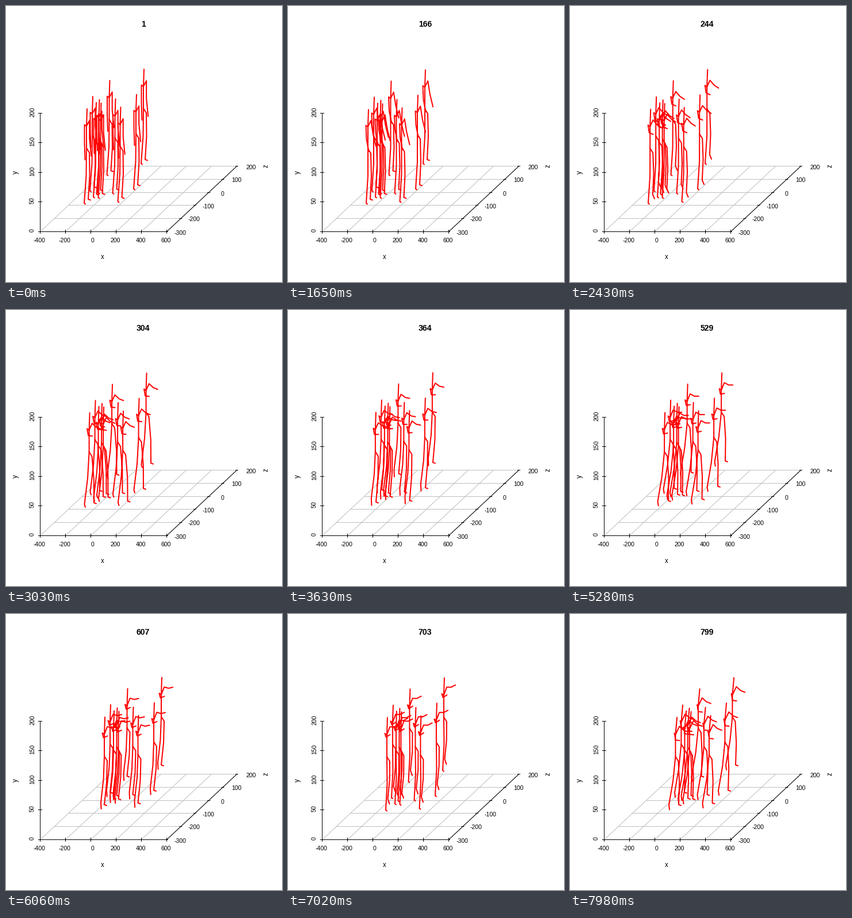
A matplotlib script that plays this animation: 480x480 px, repeating every 8 s.

```python
import numpy as np
import matplotlib.pyplot as plt
from matplotlib.animation import FuncAnimation

SIZE, DPI = 480, 80
LOOP, STEPS = 8000, 267
PX = 72 / DPI  # points per pixel

t = np.arange(STEPS) * 30.0


def span(start, end):
    return np.clip((t - start) / (end - start), 0, 1)


def ease(start, end):
    u = span(start, end)
    return u * u * (3 - 2 * u)


def point(x, y):
    """One (x, y) pair for each step."""
    return np.stack(np.broadcast_arrays(x, y, t)[:2], axis=1)


def mix(a, b, u):
    return a + (b - a) * u


def foot(x, y, swings, toe):
    """Ankle and toe paths from swings given as (start, end, stride)."""
    lift = 0
    for start, end, stride in swings:
        x = x + stride * ease(start, end)
        lift = lift + np.sin(np.pi * span(start, end))
    tip = point(x + toe - 1.5 * lift, y + 1.5 - 4 * lift)
    return point(x, y - 15 * lift), tip


def knee(hip, ankle):
    return (hip + ankle) / 2 + [1.5, 0]


# ---- one walker, in pixels ----
head = point(141 - ease(0, 1500) + 15.5 * ease(2300, 4100)
             + 16.5 * ease(4500, 5900) + 16 * ease(6800, 8300),
             179 + 1.2 * np.sin(2 * np.pi * t / 5800))
lean = -1 - 1.7 * ease(7300, 8000)
neck = head + point(lean, 30)
pelvis = head + point(lean, 68)
hip_r = pelvis + [5, 8]
shoulder_l = head + [-4.5, 27.5]
shoulder_r = head + point(4.2, 20 - 4.5 * t / LOOP)

# arms hang, then rise and sway up and down
rise = ease(1000, 2700)
reach = np.sin(rise * np.pi / 2)
sway = np.interp(t, [3000, 4300, 5300, 7000, 8000], [10, 4, 4, -4, 10])
elbow_r = shoulder_r + point(7.5 * reach, mix(31, 2 + 0.5 * sway, rise))
hand_r = shoulder_r + point(mix(3, 15, reach), mix(62, sway, rise))
elbow_l = shoulder_l + point(2 * reach, mix(30, 8 + 0.4 * sway, rise))
hand_l = shoulder_l + point(mix(1, 9, reach), mix(61, 5 + 0.8 * sway, rise))

rising = ease(2300, 5200)
ankle_l, toe_l = foot(136, 343 - 2 * rising, toe=2, swings=[
    (2900, 4200, 15), (5000, 6600, 19), (7700, 9100, 19)])
ankle_r, toe_r = foot(143, 336 - 4.5 * rising, toe=4, swings=[
    (2300, 3000, 10), (4400, 5200, 18), (6750, 7900, 18)])

gap = np.full_like(head, np.nan)
body = np.stack([
    head, neck, pelvis, hip_r, knee(hip_r, ankle_r), ankle_r, toe_r, gap,
    pelvis, knee(pelvis, ankle_l), ankle_l, toe_l, gap,
    hand_l, elbow_l, shoulder_l, neck, shoulder_r, elbow_r, hand_r, gap,
], axis=1)

# where the others stand, relative to the first walker
crowd = np.array([(0, 0), (10, -21.5), (16, -11), (21.5, -16), (24.5, -10),
                  (39.5, -49.5), (49.5, -17.5), (58.5, -3), (99, -69),
                  (86, -25)])

# ---- stage ----
fig = plt.figure(figsize=(SIZE / DPI, SIZE / DPI), dpi=DPI, facecolor="white")
ax = fig.add_axes([0, 0, 1, 1])
ax.set(xlim=(0, SIZE), ylim=(SIZE, 0))
ax.axis("off")


def line(x0, y0, x1, y1, color="black", z=2):
    ax.plot([x0, x1], [y0, y1], color=color, lw=PX, zorder=z,
            snap=False, solid_capstyle="projecting")


def label(x, y, text, size=10.5, rot=0, **kw):
    return ax.text(x, y, text, fontsize=size * PX, rotation=rot, ha="center",
                   va="baseline", rotation_mode="anchor",
                   family="Liberation Sans", **kw)


X0, X1, Y0 = 59.5, 279.5, 392.5
DX, DY = 122, -114  # depth axis from front to back

for k in range(6):
    x = X0 + 44 * k
    dx, dy = DX * k / 5, round(DY * k / 5)
    line(x, Y0, x + DX, Y0 + DY, "#bebebe", 1)
    line(X0 + dx, Y0 + dy, X1 + dx, Y0 + dy, "#bebebe", 1)
    line(x, Y0 - 3, x, Y0 + 3)
    line(X1 + dx - 2, Y0 + dy, X1 + dx + 2, Y0 + dy)
    value = -400 + 200 * k
    label(x + (2.5 if value == 0 else -1.5), 411, str(value))
    label(302.7 + 24.6 * k, Y0 + dy + 5, str(-300 + 100 * k))

for k in range(5):
    y = Y0 - round(51.6 * k)
    line(X0 - 3, y, X0 + 3, y)
    label(49, y - 2, str(50 * k), rot=90)

line(X0, Y0, X1, Y0)
line(X0, Y0, X0, Y0 - 206)
line(X1, Y0, X1 + DX, Y0 + DY)

label(168, 440, "x", 11.5)
label(20, 289, "y", 11.5, 90)
label(456, 278, "z", 11.5, 90)

title = label(238.5, 36, "1", 14, weight="bold")
walkers, = ax.plot([], [], color="red", lw=2 * PX, zorder=3,
                   solid_capstyle="round", solid_joinstyle="round")


def draw(i):
    pts = (body[i] + crowd[:, None]).reshape(-1, 2)
    walkers.set_data(pts[:, 0], pts[:, 1])
    title.set_text(str(3 * i + 1))
    return walkers, title


anim = FuncAnimation(fig, draw, frames=STEPS, interval=LOOP / STEPS,
                     init_func=lambda: draw(0), repeat=True, repeat_delay=0)
plt.show()
```
